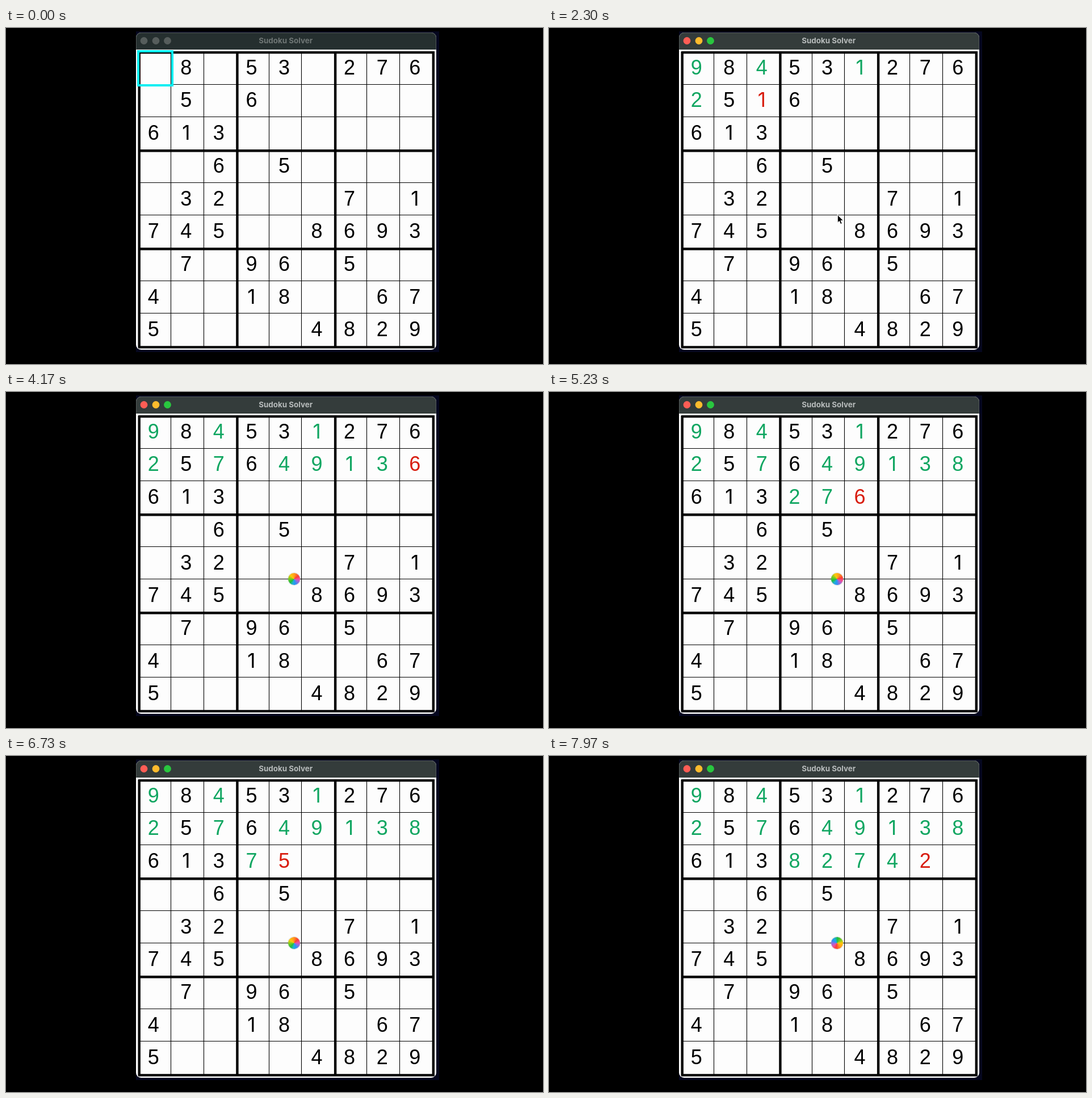
Write an HTML page that moves like this. It is 946 px wide and 592 px high and loops after 8 s.

```html
<!DOCTYPE html>
<html lang="en">
<head>
<meta charset="utf-8">
<title>Sudoku Solver</title>
<style>
  html, body { margin: 0; width: 100%; height: 100%; overflow: hidden; background: #000; }
  #stage { position: relative; width: 946px; height: 592px; overflow: hidden; }
  svg { position: absolute; inset: 0; }
  .digit { font: 36px "Liberation Sans", Arial, sans-serif; text-anchor: middle; }
  .footless { font-family: Inter, sans-serif; font-size: 35px; }
  .title { font: 700 13.4px Inter, sans-serif; text-anchor: middle; fill: #b7bbbb; }
  .inactive .title { fill: #6f7675; }
  .bar { fill: #343c3b; }
  .inactive .bar { fill: #252f2f; }
  .inactive .light { fill: #565d5c; }
  #ball {
    position: absolute; left: 497px; top: 319px; width: 21px; height: 21px;
    border-radius: 50%; box-shadow: 0 0 2px #0006;
    background: conic-gradient(#ffc80a, #ff9a1e 50deg, #fb3d35 100deg, #f0509a 135deg,
      #a765d8 165deg, #2795f5 210deg, #1fb0d8 240deg, #1fbf3c 275deg, #7ccc20 320deg, #ffc80a);
  }
</style>
</head>
<body>
<div id="stage">
  <svg id="scene" width="946" height="592" viewBox="0 0 946 592">
    <rect x="229" y="6" width="534" height="565" fill="#05071f"/>
    <rect x="229" y="8" width="529" height="559" rx="9" fill="#fdfdfd"/>
    <path class="bar" d="M229 38V17a9 9 0 0 1 9-9H749a9 9 0 0 1 9 9V38Z"/>
    <path d="M229.5 38V17a8.5 8.5 0 0 1 8.5-8.5H749a8.5 8.5 0 0 1 8.5 8.5V38" fill="none" stroke="#5c6463" stroke-width=".8"/>
    <circle class="light" cx="243" cy="22.5" r="6.4" fill="#fe5d55"/>
    <circle class="light" cx="264" cy="22.5" r="6.4" fill="#fdbb2d"/>
    <circle class="light" cx="284.5" cy="22.5" r="6.4" fill="#29c63f"/>
    <text class="title" x="492.7" y="27">Sudoku Solver</text>
    <g id="grid" stroke="#000"></g>
    <rect id="selection" x="233" y="41" width="60" height="60" fill="none" stroke="#08eef2" stroke-width="4"/>
    <g id="digits"></g>
    <path id="arrow" d="M0 0V14.2L3.2 11.2 5.4 16.6 8 15.5 5.8 10.3H10.2Z" fill="#000" stroke="#fff"/>
  </svg>
  <div id="ball"></div>
</div>
<script>
const LOOP = 8000;
const ACTIVATE = 950;
const SOLVE_START = 1238;
const STEP = 62.5;
const BUSY = 3600;
const SPIN = 515;
const LEFT = 232.9, TOP = 41.3, CELL_W = 57.57, CELL_H = 57.7;
const GREEN = '#10a661', RED = '#d81c0e';

const puzzle = [...[
  '.8.53.276', '.5.6.....', '613......',
  '..6.5....', '.32...7.1', '745..8693',
  '.7.96.5..', '4..18..67', '5....4829'
].join('')].map(Number).map(n => n || 0);

const $ = id => document.getElementById(id);
const rowOf = i => Math.floor(i / 9);
const colOf = i => i % 9;
const third = n => Math.floor(n / 3);

function add(parent, tag, attrs) {
  const el = document.createElementNS('http://www.w3.org/2000/svg', tag);
  for (const key in attrs) el.setAttribute(key, attrs[key]);
  return parent.appendChild(el);
}

for (let i = 0; i <= 9; i++) {
  const thick = i % 3 === 0;
  const place = p => thick ? p + 1.8 : Math.floor(p) + .5;
  const x = place(LEFT + i * CELL_W), y = place(TOP + i * CELL_H);
  add($('grid'), 'path', { d: `M${x} 42V563M233 ${y}H755`, 'stroke-width': thick ? 4.4 : 1.1 });
}

function setDigit(text, value, color) {
  text.textContent = value || '';
  text.setAttribute('fill', color);
  text.classList.toggle('footless', value === 1);
}

const cells = puzzle.map((value, i) => {
  const text = add($('digits'), 'text', {
    class: 'digit',
    x: 259.7 + colOf(i) * CELL_W,
    y: 81.7 + rowOf(i) * CELL_H
  });
  setDigit(text, value, '#000');
  return text;
});

const blanks = [...puzzle.keys()].filter(i => !puzzle[i]);

function fits(board, cell, value) {
  const row = rowOf(cell), col = colOf(cell);
  return board.every((other, i) => {
    if (other !== value || i === cell) return true;
    const r = rowOf(i), c = colOf(i);
    const sameBox = third(r) === third(row) && third(c) === third(col);
    return r !== row && c !== col && !sameBox;
  });
}

// Backtracking search recorded as a list of attempts.
function attempts(limit) {
  const board = [...puzzle], steps = [];
  let index = 0;
  while (steps.length < limit) {
    const cell = blanks[index], value = board[cell] + 1;
    if (value > 9) {
      board[cell] = 0;
      index--;
      continue;
    }
    board[cell] = value;
    const valid = fits(board, cell, value);
    steps.push({ index, value, valid });
    if (valid) index++;
  }
  return steps;
}

const steps = attempts(Math.floor((LOOP - SOLVE_START) / STEP));
let shown = -1;

function showSteps(count) {
  if (count === shown) return;
  shown = count;
  const state = [];
  for (const step of steps.slice(0, count)) {
    state.length = step.index;
    state.push(step);
  }
  blanks.forEach((cell, i) => {
    const step = state[i];
    setDigit(cells[cell], step?.value, step?.valid ? GREEN : RED);
  });
}

function render(t) {
  const count = Math.max(0, Math.floor((t - SOLVE_START) / STEP));
  showSteps(count);
  $('scene').classList.toggle('inactive', t < ACTIVATE);
  $('selection').style.display = count ? 'none' : '';

  const p = Math.min(1, Math.max(0, (t - 100) / 730));
  const rest = (1 - p) ** 3;
  $('arrow').setAttribute('transform', `translate(${508.3 + 254 * rest} ${329 + 230 * rest})`);
  $('arrow').style.display = p > 0 && t < BUSY ? '' : 'none';

  $('ball').style.display = t < BUSY ? 'none' : '';
  $('ball').style.transform = `rotate(${315 + (t - 4170) / SPIN * 360}deg)`;
}

const start = performance.now();
function frame(now) {
  render(Math.max(0, now - start) % LOOP);
  requestAnimationFrame(frame);
}
render(0);
requestAnimationFrame(frame);
</script>
</body>
</html>
```
